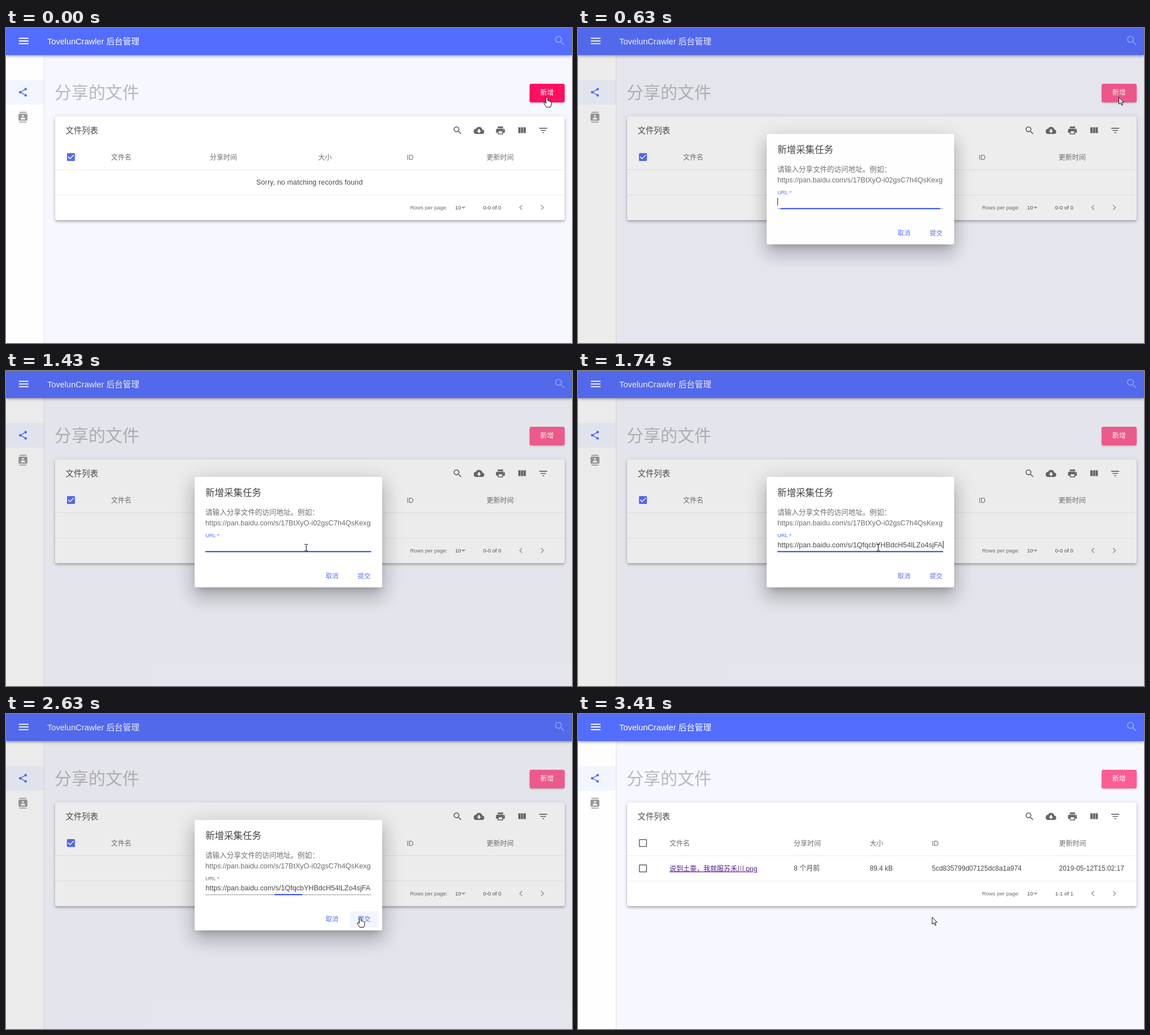
Animation, 1002 px wide and 559 px high, one loop 4480 ms. Source, as an HTML page:

```html
<!DOCTYPE html>
<html lang="zh-CN">
<head>
<meta charset="utf-8">
<title>后台管理</title>
<style>
html, body { margin: 0; width: 100%; height: 100%; overflow: hidden; background: #f6f7ff; }
div, svg { position: absolute; box-sizing: border-box; }
svg { left: 0; top: 0; width: 1002px; height: 559px; }
text { font-family: "Liberation Sans", "Noto Sans CJK SC", "Noto Sans CJK", sans-serif; white-space: pre; }
.raised { box-shadow: 0 1.6px 3.2px -.8px #0003, 0 3.2px 4px #00000024, 0 .8px 8px #0000001f; }
#side { left: 0; top: 48px; width: 68px; height: 511px; background: #fefefe; border-right: 1px solid #e0e0e4; }
#chosen { left: 0; top: 92px; width: 67px; height: 44px; background: #f3f5ff; }
#bar { left: 0; top: 0; width: 1002px; height: 48px; background: #536dfe; }
#paper { left: 86.5px; top: 156.5px; width: 902px; height: 184.5px; background: #fff; border-radius: 3px; }
#add { left: 927px; top: 98.5px; width: 61.5px; height: 33px; border-radius: 3px;
  box-shadow: 0 2px 4px -1px #0002, 0 1px 3px #0002; }
#shade { left: 0; top: 0; width: 1002px; height: 559px; background: #4a4a4a1a; }
#box { left: 334px; top: 188px; width: 331.5px; height: 196px; background: #fff; border-radius: 3px;
  box-shadow: 0 8.6px 11.8px -5.5px #0003, 0 18.9px 29.9px 2.4px #00000024, 0 7px 36px 6.3px #0000001f; }
</style>
</head>
<body>
<div id="side"></div>
<div id="chosen"></div>
<div id="paper" class="raised"></div>
<div id="add"></div>
<div id="bar" class="raised"></div>
<svg id="page"></svg>
<div id="shade"></div>
<div id="dialog"><div id="box"></div><svg id="form"></svg></div>
<svg id="pointer"></svg>
<script>
const $ = id => document.getElementById(id);
const BLUE = '#536dfe', DARK = '#4a4a4a', GREY = '#6e6e6e';

const text = (x, y, size, fill, str, attrs = '') =>
  `<text x="${x}" y="${y}" font-size="${size}" fill="${fill}" ${attrs}>${str}</text>`;
const row = (y, fill, cells) => cells.map(([x, str]) => text(x, y, 12, fill, str)).join('');

const ICONS = {
  menu: 'M3 18h18v-2H3zm0-5h18v-2H3zm0-7v2h18V6z',
  search: 'M15.5 14h-.79l-.28-.27C15.41 12.59 16 11.11 16 9.5 16 5.91 13.09 3 9.5 3S3 5.91 3 9.5 5.91 16 9.5 16c1.61 0 3.09-.59 4.23-1.57l.27.28v.79l5 4.99L20.49 19zm-6 0C7.01 14 5 11.99 5 9.5S7.01 5 9.5 5 14 7.01 14 9.5 11.99 14 9.5 14z',
  share: 'M18 16.08c-.76 0-1.44.3-1.96.77L8.91 12.7c.05-.23.09-.46.09-.7s-.04-.47-.09-.7l7.05-4.11c.54.5 1.25.81 2.04.81a3 3 0 1 0-3-3c0 .24.04.47.09.7L8.04 9.81A3 3 0 1 0 6 15c.79 0 1.5-.31 2.04-.81l7.12 4.16c-.05.21-.08.43-.08.65a2.92 2.92 0 1 0 2.92-2.92z',
  contacts: 'M20 0H4v2h16zM4 24h16v-2H4zM20 4H4a2 2 0 0 0-2 2v12a2 2 0 0 0 2 2h16a2 2 0 0 0 2-2V6a2 2 0 0 0-2-2zm-8 2.75a2.25 2.25 0 1 1 0 4.5 2.25 2.25 0 0 1 0-4.5zM17 17H7v-1.5c0-1.67 3.33-2.5 5-2.5s5 .83 5 2.5z',
  cloud: 'M19.35 10.04A7.5 7.5 0 0 0 5.35 8.04 6 6 0 0 0 6 20h13a5 5 0 0 0 .35-9.96zM17 13l-5 5-5-5h3V9h4v4z',
  print: 'M19 8H5a3 3 0 0 0-3 3v6h4v4h12v-4h4v-6a3 3 0 0 0-3-3zm-3 11H8v-5h8zm3-7a1 1 0 1 1 0-2 1 1 0 0 1 0 2zM18 3H6v4h12z',
  columns: 'M10 18h5V5h-5zm-6 0h5V5H4zM16 5v13h5V5z',
  filter: 'M10 18h4v-2h-4zM3 6v2h18V6zm3 7h12v-2H6z',
  checked: 'M19 3H5a2 2 0 0 0-2 2v14a2 2 0 0 0 2 2h14a2 2 0 0 0 2-2V5a2 2 0 0 0-2-2zm-9 14l-5-5 1.41-1.41L10 14.17l7.59-7.59L19 8z',
  unchecked: 'M19 5v14H5V5zm0-2H5a2 2 0 0 0-2 2v14a2 2 0 0 0 2 2h14a2 2 0 0 0 2-2V5a2 2 0 0 0-2-2z',
  left: 'M15.41 7.41L14 6l-6 6 6 6 1.41-1.41L10.83 12z',
  right: 'M10 6L8.59 7.41 13.17 12l-4.58 4.59L10 18l6-6z',
  down: 'M7 10l5 5 5-5z'
};
const icon = (name, cx, cy, fill, scale = .786) =>
  `<path d="${ICONS[name]}" fill="${fill}" fill-rule="evenodd" transform="translate(${cx} ${cy}) scale(${scale}) translate(-12 -12)"/>`;

$('page').innerHTML =
  icon('menu', 31.3, 23, '#fff', .95) +
  text(73, 28.5, 14.6, '#fff', 'TovelunCrawler 后台管理') +
  icon('search', 980.5, 22.5, '#ffffff5c', .95) +
  icon('share', 30, 114, BLUE) + icon('contacts', 30, 158.3, '#9a9a9a') +
  text(86, 125, 30, '#b9b9b9', '分享的文件', 'font-weight="300"') +
  text(945.8, 119, 12, '#fff', '新增', 'font-weight="500"') +
  text(105.5, 187.3, 14.4, DARK, '文件列表') +
  ['search', 'cloud', 'print', 'columns', 'filter']
    .map((name, i) => icon(name, 799.5 + 37.9 * i, 181.8, '#666')).join('') +
  '<path d="M87 251.5H988M87 296.5H988" stroke="#ececec"/>' +
  text(715.5, 322, 9.43, GREY, 'Rows per page:') + text(795, 321.5, 9.43, DARK, '10') +
  icon('down', 809.8, 318.5, '#a5a5a5') +
  icon('left', 911.5, 318.5, '#a5a5a5') + icon('right', 949.5, 318.5, '#a5a5a5') +
  '<g id="empty">' + icon('checked', 115, 229, BLUE) +
  row(233.7, GREY, [[186, '文件名'], [360.7, '分享时间'], [552.7, '大小'], [709.5, 'ID'], [850.7, '更新时间']]) +
  text(443, 278, 12.57, DARK, 'Sorry, no matching records found', 'letter-spacing=".00938em"') +
  text(844.7, 322, 9.43, DARK, '0-0 of 0') + '</g>' +
  '<g id="filled">' + icon('unchecked', 115, 229, '#666') + icon('unchecked', 115, 274, '#666') +
  row(233.7, GREY, [[162, '文件名'], [382, '分享时间'], [516.5, '大小'], [626.5, 'ID'], [851.5, '更新时间']]) +
  text(162, 278.5, 12, '#551a8b', '说到土豪，我就服苏禾川.png', 'text-decoration="underline"') +
  row(278, DARK, [[382, '8 个月前'], [516.5, '89.4 kB'], [626.5, '5cd835799d07125dc8a1a974'], [851.5, '2019-05-12T15:02:17']]) +
  text(844.7, 322, 9.43, DARK, '1-1 of 1') + '</g>';

$('form').innerHTML =
  '<rect id="hover" x="609" y="350" width="50" height="29" rx="3" fill="#f2f4ff"/>' +
  text(353, 222, 16.5, '#444', '新增采集任务') +
  text(353, 255.3, 12.57, GREY, '请输入分享文件的访问地址。例如：') +
  text(353, 274, 12.57, GREY, 'https://pan.baidu.com/s/17BtXyO-i02gsC7h4QsKexg') +
  text(0, 0, 12.57, BLUE, 'URL *', 'id="label"') +
  text(353.3, 312.7, 12.57, DARK, 'https://pan.baidu.com/s/1QfqcbYHBdcH54lLZo4sjFA', 'id="url"') +
  '<path d="M353 320.8H646.5" stroke="#949494"/>' +
  '<rect id="line" y="319.6" height="1.7" fill="#1230ee"/>' +
  '<rect id="caret" y="301.5" width="1" height="13.5" fill="#222"/>' +
  text(566, 368, 11.2, BLUE, '取消') + text(622.7, 368, 11.2, BLUE, '提交');

$('pointer').innerHTML =
  '<circle id="glow" r="9.5" fill="#fcf551" fill-opacity=".9"/>' +
  '<g id="cursor" stroke="#111" stroke-linejoin="round">' +
  '<path id="arrow" fill="#fff" d="M0 0V12.6L2.9 10 5 14.6 6.9 13.7 4.9 9.3H8.6Z"/>' +
  '<path id="hand" fill="#fff" d="M-1.5 10V2a1.5 1.5 0 0 1 3 0V6.5q2.3-.6 2.6 1 2-.4 2.3.9 1.6 0 1.6 1.6V12q0 3.4-1.8 6H-.6Q-3 14.500-4.800 11.600-5.300 9.800-3.900 9.500-2.700 9.600-1.500 11.500Z"/>' +
  '<path id="beam" fill="none" d="M-3-5.500H-.8L0-5 .8-5.500H3M0-5V5.500M-3 6H-.8L0 5.500.8 6H3"/></g>';

// Moments at which the screen is refreshed
const TICKS = [0, 320, 400, 480, 560, 630, 690, 780, 860, 930, 1010, 1090, 1170, 1250, 1340, 1430, 1580,
  1740, 1820, 1900, 1980, 2060, 2140, 2220, 2320, 2480, 2550, 2630, 2690, 3410];
const LOOP = 4480, CLOSE = 2690, LOADED = 3410, PASTE = 1740, BLUR = 2532;

const within = (t, a, b) => t >= a && t < b;
const mix = (a, b, p) => a + (b - a) * p;
const show = (id, on) => $(id).style.display = on ? '' : 'none';
const set = (id, attrs) => { for (const k in attrs) $(id).setAttribute(k, attrs[k]); };

// cubic-bezier(x1, 0, .2, 1) over a time span
function ease(t, start, length, x1 = 0) {
  const u = Math.min(1, Math.max(0, (t - start) / length));
  let lo = 0, hi = 1;
  for (let i = 0; i < 24; i++) {
    const s = (lo + hi) / 2, r = 1 - s;
    if (3 * r * r * s * x1 + .6 * r * s * s + s ** 3 < u) lo = s; else hi = s;
  }
  return lo * lo * (3 - 2 * lo);
}
const glide = (t, a, b) => {
  const u = Math.min(1, Math.max(0, (t - a) / (b - a)));
  return u * u * (3 - 2 * u);
};

function drawForm(t) {
  const fade = ease(t, 450, 225, .4), focus = ease(t, 480, 200);
  $('shade').style.opacity = $('dialog').style.opacity = fade;
  const size = mix(1, .75, focus);
  set('label', {
    transform: `translate(353 ${mix(312.7, 294.5, focus)}) scale(${size})`,
    fill: t < BLUR ? BLUE : GREY
  });
  const half = 146.75 * (t < BLUR ? focus : 1 - ease(t, BLUR, 200));
  set('line', { x: 499.75 - half, width: 2 * half });
  set('caret', { x: t < PASTE ? 353 : 646 });
  show('caret', within(t, 500, 1010) || within(t, 1580, 2220));
  show('url', t >= PASTE);
}

function drawPointer(t, open) {
  const a = glide(t, 800, 1250), b = glide(t, 1770, 2220);
  const x = mix(mix(957.5, 531.5, a), 627, b), y = mix(mix(122.5, 313, a), 360.5, b);
  const onSubmit = open && within(x, 609, 659) && within(y, 350, 379);
  const onInput = open && within(x, 353, 647) && within(y, 300, 320);
  const onHand = onSubmit || t < 450;
  set('cursor', { transform: `translate(${x} ${y})` });
  show('hand', onHand);
  show('beam', onInput);
  show('arrow', !onHand && !onInput);
  show('hover', onSubmit);
  set('glow', { cx: onSubmit ? 628 : x - 2, cy: onSubmit ? 364.5 : y - 1.5 });
  show('glow', within(t, 320, 480) || within(t, 1250, 1430) || within(t, 2320, 2480));
}

function draw(now) {
  const clock = now % LOOP;
  const t = TICKS.filter(k => k <= clock).pop();
  const open = within(t, 450, CLOSE), calm = ease(t, 450, 250, .4);
  show('shade', open);
  show('dialog', open);
  show('empty', t < LOADED);
  show('filled', t >= LOADED);
  $('add').style.background = `rgb(255 ${mix(15, 92, calm)} ${mix(95, 147, calm)})`;
  drawForm(t);
  drawPointer(t, open);
  requestAnimationFrame(draw);
}
draw(0);
</script>
</body>
</html>
```
